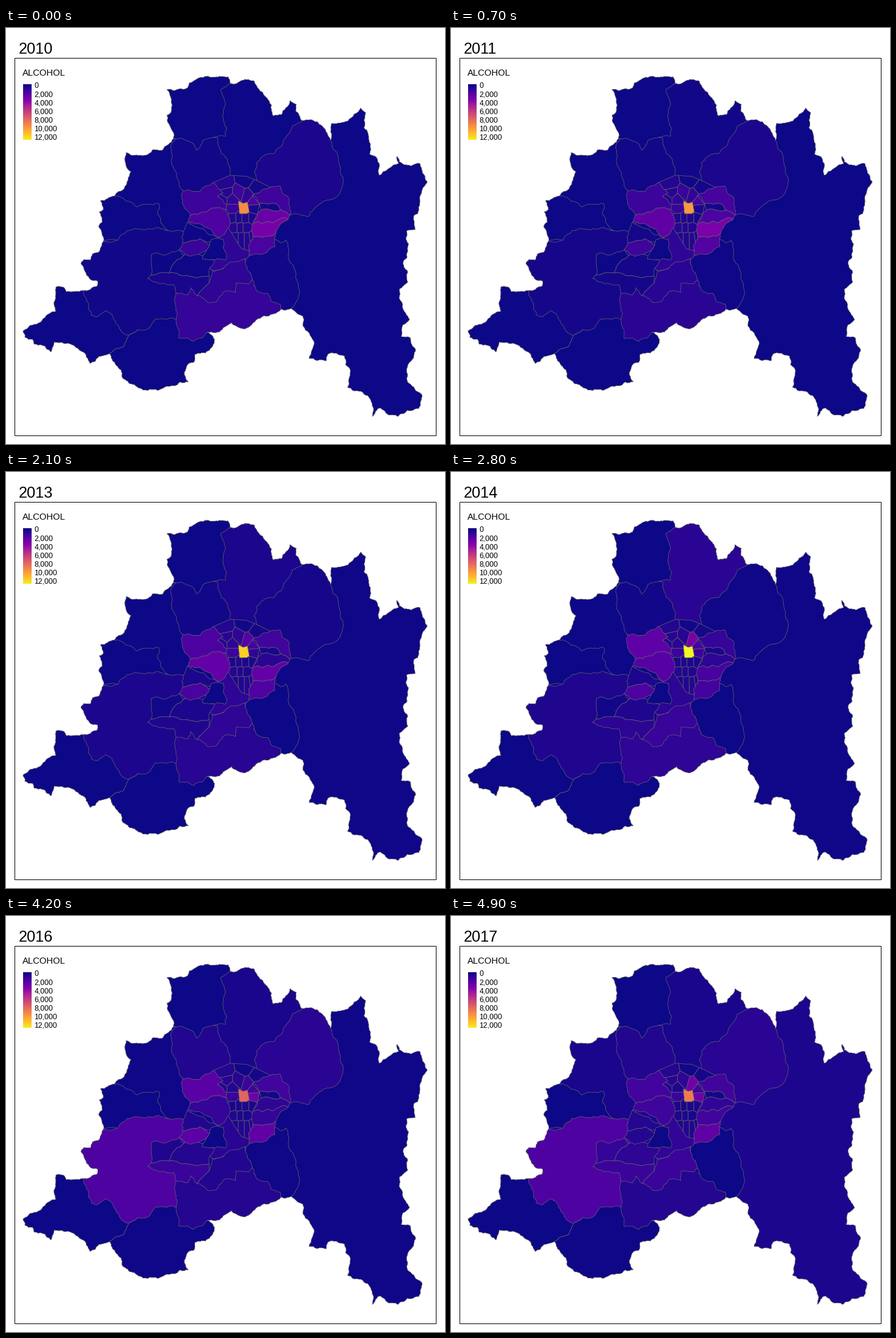
These frames come from a looping animation (720x681 px, 5600 ms). A matplotlib script:

```python
import math
import random

import matplotlib.pyplot as plt
import numpy as np
from matplotlib.animation import FuncAnimation
from matplotlib.collections import PolyCollection
from matplotlib.patches import Rectangle

W, H, DPI = 720, 681, 64
PX = 72 / DPI  # points per pixel
TOP_VALUE = 13000
YEARS = np.arange(2010, 2018)
FONT = "Liberation Sans"
PLASMA = plt.get_cmap("plasma")

polygons, series = [], []


def split(p, q, rng):
    """Fractal edge from p up to, but without, q."""
    dx, dy = q[0] - p[0], q[1] - p[1]
    if math.hypot(dx, dy) < 4:
        return [p]
    k = rng.uniform(-0.14, 0.14)
    mid = ((p[0] + q[0]) / 2 - k * dy, (p[1] + q[1]) / 2 + k * dx)
    return split(p, mid, rng) + split(mid, q, rng)


def rough(points):
    """Jagged closed outline; a shared edge looks the same from both sides."""
    out = []
    for p, q in zip(points, points[1:] + points[:1]):
        if p != q:
            a, b = sorted((p, q))
            edge = split(a, b, random.Random(f"{a}{b}")) + [b]
            out += edge[:-1] if p == a else edge[:0:-1]
    return out


def add(keys, polygon):
    """Store a district whose value moves evenly between its key years."""
    polygons.append(polygon)
    series.append(np.interp(YEARS, list(keys), list(keys.values())))


def area(keys, *arcs):
    add(keys, rough([p for arc in arcs for p in arc]))


def nearer(cell, site, other):
    """Cut off the part of cell that lies closer to other than to site."""
    a, b = np.array(site), np.array(other)

    def side(p):
        return (np.array(p) - (a + b) / 2) @ (a - b)

    out = []
    for p, q in zip(cell, cell[1:] + cell[:1]):
        sp, sq = side(p), side(q)
        if sp >= 0:
            out.append(p)
        if sp * sq < 0:
            t = sp / (sp - sq)
            out.append((p[0] + t * (q[0] - p[0]), p[1] + t * (q[1] - p[1])))
    return out


# Outer border of the region, clockwise, one arc per district
tiltil = [(275, 181), (264, 143), (271, 138), (271, 120), (264, 101), (298, 98),
          (301, 90), (330, 79), (364, 80), (368, 91)]
colina = [(368, 91), (407, 87), (425, 112), (438, 144), (452, 142), (466, 119),
          (476, 125), (475, 136), (486, 152)]
barnechea = [(486, 152), (500, 150), (519, 161), (532, 184)]
andes = [(532, 184), (534, 156), (561, 152), (582, 131), (590, 139), (587, 163),
         (594, 173), (596, 206), (607, 211), (612, 241), (644, 222), (641, 210),
         (645, 219), (664, 226), (679, 222), (691, 252), (682, 267), (675, 304),
         (669, 307), (671, 330), (657, 332), (658, 375), (651, 385), (659, 416),
         (645, 428), (650, 456), (662, 477), (651, 486), (648, 505), (663, 507),
         (672, 528), (657, 560), (657, 574), (682, 600), (677, 623), (642, 636),
         (614, 622), (601, 636), (599, 612), (560, 588), (565, 562), (555, 537),
         (528, 534), (525, 545), (497, 541), (505, 513), (487, 488), (487, 472),
         (468, 459)]
pirque = [(468, 459), (451, 460)]
paine = [(451, 460), (438, 468), (410, 478), (388, 492), (370, 482), (355, 493),
         (330, 498)]
alhue = [(330, 498), (342, 510), (339, 520), (327, 532), (310, 534), (308, 547),
         (297, 552), (292, 567), (299, 579), (250, 593), (217, 589), (190, 570),
         (189, 560), (170, 533)]
pedro = [(170, 533), (138, 549), (130, 533), (105, 517), (79, 514), (74, 530),
         (46, 517), (44, 510), (31, 506), (28, 496), (75, 465), (82, 464),
         (82, 424), (93, 424), (99, 432), (127, 430)]
melipilla = [(127, 430), (149, 423), (150, 414), (137, 410), (123, 386),
             (128, 379), (138, 380), (142, 370), (152, 367), (160, 349)]
pinto = [(160, 349), (152, 325), (158, 318), (153, 301), (160, 297), (155, 283),
         (178, 275)]
curacavi = [(178, 275), (194, 263), (205, 235), (195, 213), (197, 204),
            (233, 207), (240, 200), (257, 200), (275, 181)]

# Painted in order: a later district covers the loose inner edge of an earlier one
area({2010: 0, 2012: 100, 2016: 100, 2017: 350}, tiltil, colina, barnechea,
     andes, pirque, paine, alhue, pedro, melipilla, pinto, curacavi)
area({2010: 0, 2012: 250, 2013: 300, 2014: 650, 2015: 650, 2016: 250}, colina,
     [(470, 230), (430, 270), (340, 260), (340, 150), (345, 90)])
area({2010: 300, 2012: 250, 2014: 100, 2015: 250, 2016: 620}, barnechea,
     [(548, 235), (553, 252), (540, 278), (497, 308), (466, 306), (425, 295),
      (412, 250), (407, 235), (420, 211), (440, 205), (458, 180), (470, 160)])
area({2010: 0, 2015: 0, 2016: 80, 2017: 250}, curacavi,
     [(300, 200), (300, 290), (310, 310), (300, 333), (267, 332), (210, 300)])
area({2010: 120, 2014: 120, 2015: 450},
     [(272, 189), (271, 218), (290, 266), (340, 270), (368, 241), (347, 180),
      (330, 170), (285, 170)])
area({2010: 0}, tiltil,
     [(352, 101), (358, 130), (356, 150), (362, 165), (360, 177), (335, 180),
      (322, 185), (313, 200), (308, 190), (290, 181)])
area({2010: 0}, pinto,
     [(215, 293), (250, 287), (248, 305), (267, 332), (240, 345), (200, 345)])
area({2010: 0, 2014: 0, 2015: 80}, alhue,
     [(192, 522), (201, 503), (230, 470), (290, 470), (300, 490)])
area({2010: 0}, pedro, [(150, 440), (210, 480), (201, 503), (192, 522)])
area({2010: 120, 2012: 250, 2014: 400, 2015: 1250, 2016: 1720}, melipilla,
     [(184, 347), (200, 331), (267, 332), (291, 333), (294, 345), (300, 360),
      (300, 440), (281, 478), (275, 475), (245, 476), (233, 492), (201, 503),
      (180, 483), (165, 463), (150, 473), (140, 470)])
area({2010: 150, 2012: 0, 2014: 0, 2015: 100, 2016: 100, 2017: 0}, pirque,
     [(410, 440), (396, 400), (393, 378), (440, 345), (449, 351), (459, 347),
      (463, 375), (476, 402), (474, 452)])
area({2010: 920, 2012: 400, 2014: 720, 2015: 680, 2016: 500}, paine,
     [(308, 513), (284, 508), (278, 455), (279, 434), (310, 420), (400, 400),
      (410, 428), (430, 435), (435, 447), (450, 452)])
area({2010: 800, 2016: 650, 2017: 850},
     [(349, 343), (365, 322), (400, 330), (400, 372), (388, 380), (338, 397),
      (320, 380), (335, 350)])
area({2010: 720, 2012: 560, 2014: 1050, 2016: 450, 2017: 1100},
     [(393, 378), (372, 383), (338, 397), (333, 418), (313, 438), (330, 449),
      (345, 448), (357, 432), (377, 433), (377, 418), (398, 419), (404, 411)])
area({2010: 250, 2012: 100, 2014: 680, 2015: 1200, 2016: 1100},
     [(238, 404), (268, 401), (295, 405), (333, 405), (333, 418), (313, 438),
      (303, 425), (298, 437), (279, 434), (275, 420), (245, 416), (232, 410)])
area({2010: 0, 2014: 150, 2015: 400, 2016: 400, 2017: 950},
     [(238, 371), (284, 363), (292, 372), (272, 390), (268, 401), (238, 404)])
area({2010: 80, 2014: 400, 2016: 480, 2017: 720},
     [(292, 372), (318, 371), (342, 380), (333, 405), (295, 405), (268, 401),
      (272, 390)])
area({2010: 80, 2012: 250, 2017: 500},
     [(298, 318), (349, 343), (332, 350), (318, 345), (290, 352), (291, 333)])
area({2010: 0},
     [(336, 347), (357, 346), (356, 358), (362, 372), (360, 380), (342, 380),
      (322, 378), (334, 355)])
area({2010: 1050, 2012: 1350, 2014: 1700, 2015: 2400, 2016: 2150, 2017: 500},
     [(284, 363), (290, 352), (318, 345), (334, 355), (328, 365), (302, 374)])

# Small inner districts: each takes the part of the core nearest to its site
core = [(340, 253), (368, 241), (395, 243), (412, 250), (436, 262), (404, 274),
        (416, 288), (413, 303), (405, 319), (405, 342), (398, 365), (386, 361),
        (363, 325), (365, 303), (347, 274)]
sites = {
    (358, 256): {2010: 500},
    (393, 250): {2010: 150},
    (410, 262): {2010: 200},
    (361, 270): {2010: 600},
    (354, 281): {2010: 500},
    (371, 281): {2010: 900, 2017: 400},
    (382, 270): {2010: 1200, 2015: 400, 2017: 800},
    (396, 274): {2010: 900, 2012: 900, 2014: 3000, 2015: 1400, 2016: 1100, 2017: 2800},
    (407, 283): {2010: 1600, 2017: 1300},
    (408, 296): {2010: 350, 2012: 350, 2014: 1200, 2015: 1200, 2016: 2700},
    (404, 311): {2010: 350},
    (371, 296): {2010: 1100},
    (403, 342): {2010: 400},
}
rng = random.Random(4)
for row in range(3):
    for col in range(3):
        site = (372 + 10 * col + 2 * row, 311 + 16 * row)
        sites[site] = {2010: rng.uniform(350, 600), 2017: rng.uniform(200, 450)}
for site, keys in sites.items():
    cell = core
    for other in sites:
        if other != site:
            cell = nearer(cell, site, other)
    add(keys, cell)

# Larger districts around the core, then the centre
area({2010: 1150, 2012: 1100, 2014: 2200, 2015: 2450, 2016: 2050, 2017: 1350},
     [(290, 266), (318, 268), (340, 253), (356, 270), (347, 276), (362, 290),
      (360, 297), (325, 301), (302, 307), (288, 280)])
area({2010: 1720, 2012: 2800, 2014: 1950, 2015: 1800, 2016: 950, 2017: 1250},
     [(302, 307), (325, 301), (360, 297), (367, 317), (349, 343), (335, 329),
      (298, 318)])
area({2010: 1250, 2012: 1650, 2014: 950, 2015: 900, 2016: 1300},
     [(404, 274), (450, 259), (453, 270), (464, 278), (466, 306), (450, 298),
      (445, 289), (416, 288)])
area({2010: 150, 2014: 350, 2016: 150},
     [(416, 288), (445, 289), (450, 298), (419, 298)])
area({2010: 2550, 2012: 600, 2017: 850},
     [(419, 298), (450, 298), (466, 306), (463, 312), (440, 318), (405, 319),
      (413, 303)])
area({2010: 3000, 2012: 3200, 2014: 1500, 2016: 950, 2017: 1300},
     [(405, 319), (440, 318), (463, 312), (442, 336), (405, 342)])
area({2010: 1550, 2012: 2150, 2014: 1400, 2015: 1400, 2016: 2250},
     [(405, 342), (442, 336), (441, 358), (398, 372)])
add({2010: 9400, 2012: 10500, 2014: 13000, 2015: 9900, 2016: 7800, 2017: 8800},
    [(381, 283), (389, 287), (396, 285), (399, 301), (395, 304), (383, 304)])

fig = plt.figure(figsize=(W / DPI, H / DPI), dpi=DPI, facecolor="white")
ax = fig.add_axes([0, 0, 1, 1])
ax.axis("off")


def text(x, y, s, size):
    return ax.text(x, y, s, fontsize=size * PX, family=FONT, va="baseline")


shares = np.array(series) / TOP_VALUE
districts = PolyCollection(polygons, edgecolors="#666666", linewidths=0.7 * PX)
ax.add_collection(districts)
ax.add_patch(Rectangle((14.5, 49.5), 691, 618, fill=False, lw=PX, ec="black",
                       snap=False))

# Legend
ramp = np.clip((np.arange(92, 183) + 0.5 - 94) / 7 * 1000, 0, TOP_VALUE)
ax.imshow(ramp[:, None], cmap=PLASMA, vmin=0, vmax=TOP_VALUE, aspect="auto",
          extent=(28, 42, 183, 92), interpolation="nearest")
text(26.5, 78, "ALCOHOL", 14.8)
for i in range(7):
    text(46.6, 98 + 14 * i, f"{2000 * i:,}", 12.2)

title = text(21, 42, "", 25.2)
ax.set_xlim(0, W)
ax.set_ylim(H, 0)


def draw(i):
    title.set_text(str(YEARS[i]))
    districts.set_facecolor(PLASMA(shares[:, i]))
    return districts, title


anim = FuncAnimation(fig, draw, frames=len(YEARS), interval=700, repeat=True)
plt.show()
```
